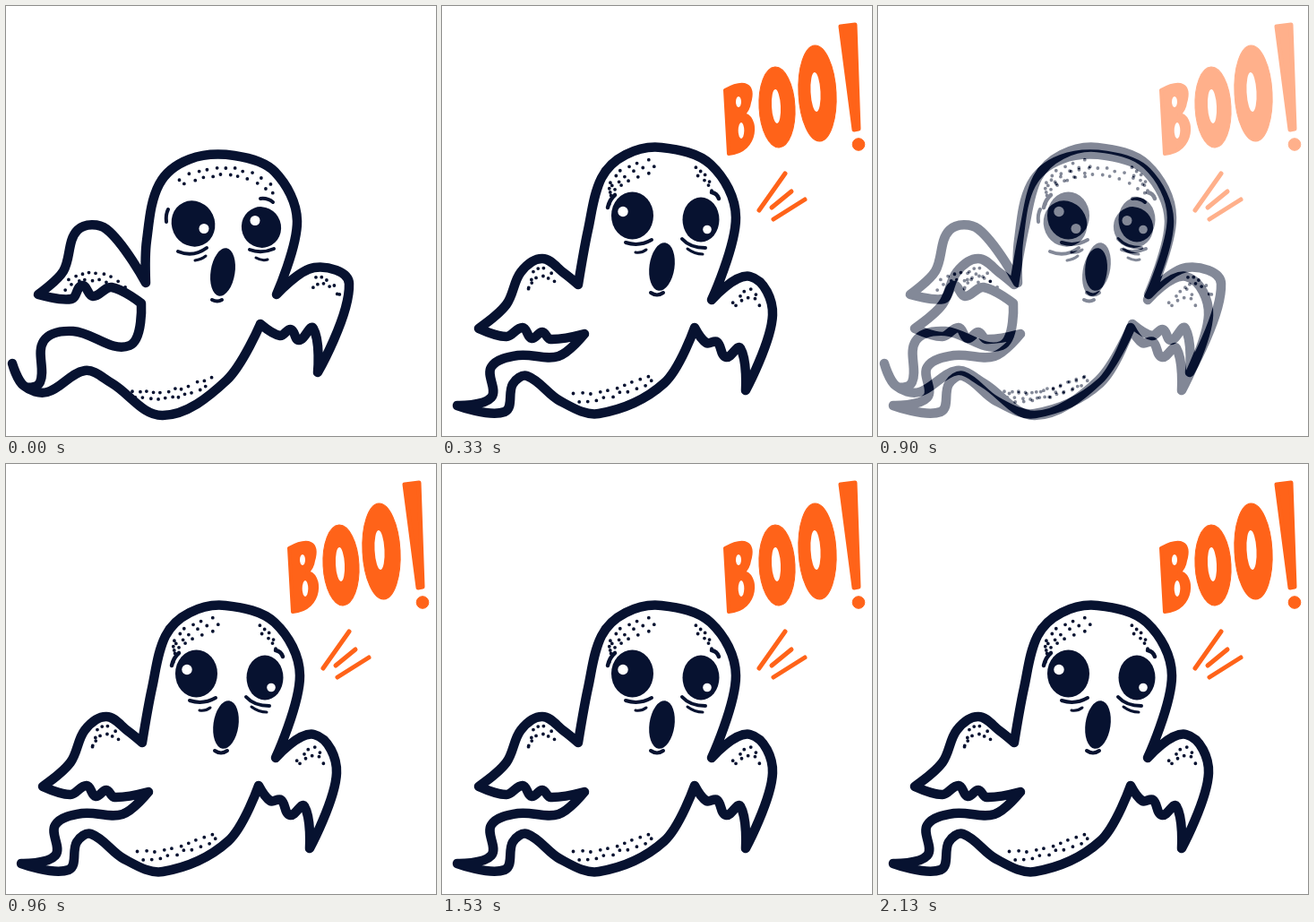
An HTML page for the animation above (2.4 s loop, 480 px wide and 480 px high).

```html
<!DOCTYPE html>
<html lang="en">
<head>
<meta charset="utf-8">
<title>Boo ghost</title>
<style>
  html, body { margin: 0; width: 100%; height: 100%; overflow: hidden; background: #fff; }
  svg { display: block; width: 100vw; height: 100vh; }
  path { fill: none; stroke: #071230; stroke-linecap: round; stroke-linejoin: round; }
  .ink { fill: #071230; }
  .paper { fill: #fff; }
  .boo { fill: #ff6319; stroke: #ff6319; }
  ellipse { stroke: none; }
</style>
</head>
<body>
<svg id="stage" viewBox="0 0 480 480"></svg>
<script>
// Smooth closed curve through "x,y" key points; "!" marks a sharp corner.
function curve(text) {
  const pts = text.trim().split(/\s+/).map(p => {
    const [x, y] = p.split(',').map(parseFloat);
    return { x, y, sharp: p.endsWith('!') };
  });
  const n = pts.length, at = i => pts[(i + n) % n];
  const handle = (i, len) => {
    const p = at(i), a = at(i - 1), b = at(i + 1);
    const k = p.sharp ? 0 : len / 3 / Math.hypot(b.x - a.x, b.y - a.y);
    return `${p.x + (b.x - a.x) * k},${p.y + (b.y - a.y) * k}`;
  };
  return pts.reduce((d, p, i) => {
    const q = at(i + 1), len = Math.hypot(q.x - p.x, q.y - p.y);
    return `${d}C${handle(i, len)} ${handle(i + 1, -len)} ${q.x},${q.y}`;
  }, `M${pts[0].x},${pts[0].y}`) + 'Z';
}

const line = (width, d, cls = '') => `<path class="${cls}" stroke-width="${width}" d="${d}"/>`;
const body = text => line(10.5, curve(text), 'paper');
const oval = (cls, x, y, rx, ry = rx, turn = 0) =>
  `<ellipse class="${cls}" cx="${x}" cy="${y}" rx="${rx}" ry="${ry}" transform="rotate(${turn} ${x} ${y})"/>`;

let seed = 7;
const jitter = () => ((seed = seed * 16807 % 2147483647) / 2147483647 - 0.5) * 3;

// Staggered rows of dots along a bent band from a to b, pulled towards c.
function speckle(a, c, b, n, rows, gap) {
  let d = '';
  for (let row = 0; row < rows; row++)
    for (let i = 0; i < n; i++) {
      const t = (i + row % 2 / 2) / n, u = 1 - t;
      const [x, y] = [0, 1].map(k => u * u * a[k] + 2 * u * t * c[k] + t * t * b[k] + jitter());
      d += `M${x} ${y + row * gap}h.01`;
    }
  return line(3.8, d);
}

const floating = [
  body(`156,309! 157,262 171,199 205,171 255,167 300,185 325,240 302,322!
    344,292 383,310 348,409! 343,360 327,373 318,361 306,368 284,355!
    246,418 175,457 118,421 88,407 46,431 20,424 7,399! 20,424 38,420 42,374
    75,363 138,379 151,332! 118,314 97,324 85,312 73,327 36,322! 64,296 80,250 112,249`),
  oval('ink', 209, 243, 24, 26, -25), oval('paper', 221, 248.5, 5.5),
  oval('ink', 285, 247, 22, 23, -20), oval('paper', 278, 239.5, 5.5),
  oval('ink', 242, 297, 13.5, 27, 9),
  line(4, 'M230 328Q236 331 241 328M181 227Q178 233 179 241M284 215Q292 214 298 219M192 274Q209 281 224 270M272 272Q285 277 299 271'),
  line(3, 'M211 284Q218 283 223 279M279 281Q286 285 292 283'),
  speckle([195, 193], [250, 163], [304, 205], 11, 2, 8),
  speckle([66, 317], [98, 290], [138, 326], 9, 2, -8),
  speckle([342, 313], [360, 300], [374, 334], 5, 2, -7),
  speckle([138, 436], [185, 447], [232, 419], 12, 2, -8)
].join('');

const shouting = [
  body(`152,311! 163,250 178,192 205,166 245,158 300,177 328,236 301,328!
    344,302 369,345 339,429! 333,382 317,392 307,375 295,376 282,359!
    248,421 175,455 132,441 95,413 79,422 70,453 17,446! 55,437 55,403
    85,390 130,391 159,366! 121,372 112,364 100,371 90,359 72,369 41,360! 72,333 88,297 112,282 136,298`),
  oval('ink', 212.5, 234, 23.5, 26.5), oval('paper', 202, 229.5, 5.7),
  oval('ink', 289, 238.5, 20.5, 25), oval('paper', 296, 249.5, 4.8),
  oval('ink', 245.5, 291, 14, 27, 8),
  line(4.5, 'M185 225Q187 216 193 211M301 208Q307 209 309 215'),
  line(4, 'M233 320Q240 325 247 320M205 264Q220 269 234 261M268 260Q277 270 294 270'),
  line(3, 'M216 275Q223 276 228 272M274 271Q282 277 291 277'),
  speckle([186, 204], [192, 176], [244, 170], 7, 3, 8),
  speckle([284, 180], [296, 186], [301, 205], 4, 2, 7),
  speckle([96, 314], [104, 280], [130, 303], 6, 2, 8),
  speckle([326, 332], [341, 302], [358, 331], 5, 2, 9),
  speckle([148, 434], [195, 430], [239, 409], 10, 2, 8),
  line(4, 'M316 94C338 82 349 88 343 108Q342 116 336 121C352 122 354 162 320 165Z', 'boo'),
  oval('paper', 331, 107, 3, 6), oval('paper', 334, 139, 3.3, 9),
  oval('boo', 374, 113, 20, 45, -3), oval('paper', 373, 112, 5, 19, -3),
  oval('boo', 419, 97.5, 21, 53.5, -3), oval('paper', 417, 96, 5.5, 22, -3),
  line(5, 'M445 23L461 21L465 137L460 138Z', 'boo'),
  oval('boo', 465, 154.5, 6.8),
  line(5, 'M354 228L383 187M368 225L390 207M370 238L405 216', 'boo')
].join('');

document.getElementById('stage').innerHTML =
  `${floating}<g id="shout"><rect class="paper" width="480" height="480"/>${shouting}</g>`;
const shout = document.getElementById('shout');

// Poses swap every 300 ms, each swap opening with a short half-mix.
const beat = 300, mixTimes = [0, 30, 30, 60, 60, 30, 30, 30];
function draw(now) {
  const t = now % (beat * mixTimes.length), step = Math.floor(t / beat);
  shout.setAttribute('opacity', t % beat < mixTimes[step] ? 0.5 : step % 2);
  requestAnimationFrame(draw);
}
draw(performance.now());
</script>
</body>
</html>
```
